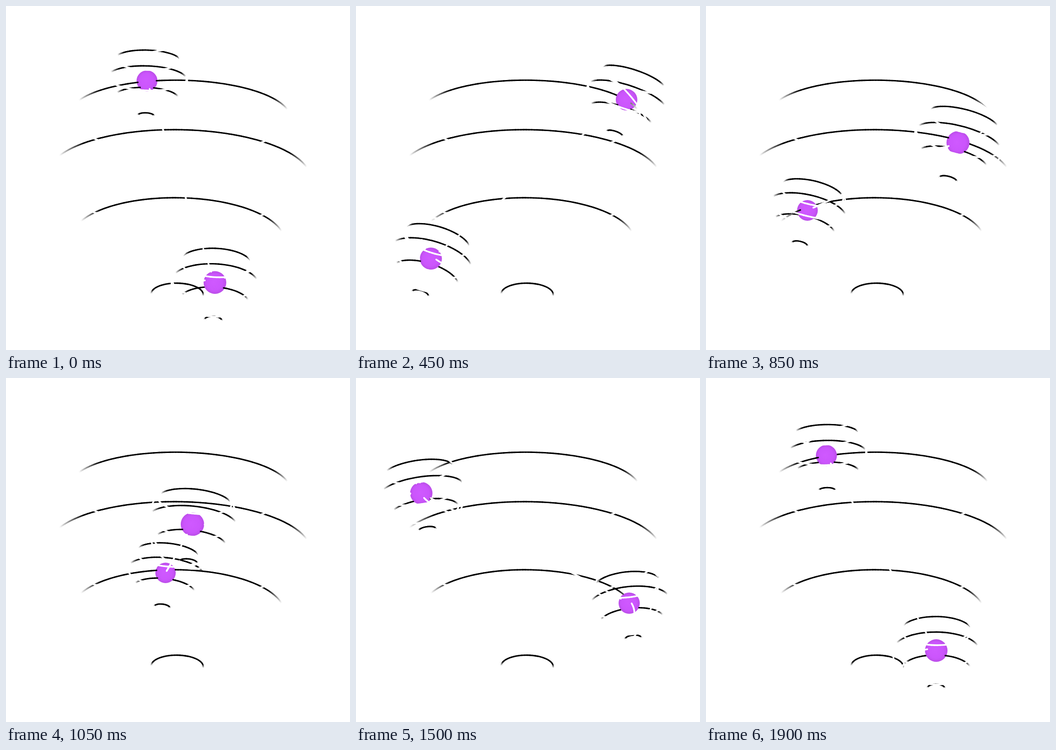
An HTML page with a canvas that plays this animation: 748 px wide and 748 px high, repeating every 1950 ms.

```html
<!DOCTYPE html>
<html lang="en">
<head>
<meta charset="utf-8">
<title>Orbits</title>
<style>
  html, body { margin: 0; width: 100%; height: 100%; overflow: hidden; background: #fff; }
  canvas { display: block; width: 748px; height: 748px; }
</style>
</head>
<body>
<canvas id="stage" width="748" height="748"></canvas>
<script>
const ctx = document.getElementById('stage').getContext('2d');
const RAD = Math.PI / 180;
const LOOP = 1950, STEP = 50, TURN = 1967;
const FOCAL = 3900, CENTER = { x: 376, y: 374 };
const SIN_P = Math.sin(21.2 * RAD), COS_P = Math.cos(21.2 * RAD);
const BASE_ROLL = 0.8, SMALL = 0.313, BALL_R = 23.7;
const DARK_LINE = 3.1, WHITE_LINE = 3.6;

// Rings of one globe; each is dark between the azimuths from and to (0 = far side).
const RINGS = [
  { y: 146, r: 237, from: -69, to: 80 },
  { y: 9.5, r: 285.5, from: -69, to: 80 },
  { y: -140, r: 234, from: -69, to: 80 },
  { y: -277.5, r: 58, from: -92, to: 102 }
];
const FADE = 20;
const OUTLINE = { r: 290, y: -10 };

// Balls on their orbits; lift raises the small globe above its ball.
const BODIES = [
  { y: 147.5, r: 236.5, phase: -18.3, lift: 4 },
  { y: -147.5, r: 234, phase: 160.7, lift: 0 }
];

// World to view: x right, y up, z towards the eye.
function view(p) {
  return { x: p.x, y: p.y * COS_P - p.z * SIN_P, z: p.y * SIN_P + p.z * COS_P };
}

function project(v) {
  const s = FOCAL / (FOCAL - v.z);
  return { x: CENTER.x + v.x * s, y: CENTER.y - v.y * s, z: v.z, s };
}

function onRing(origin, y, r, azimuth, roll) {
  const x = r * Math.sin(azimuth), c = Math.cos(roll), s = Math.sin(roll);
  return {
    x: origin.x + x * c + y * s,
    y: origin.y + y * c - x * s,
    z: origin.z - r * Math.cos(azimuth)
  };
}

function darkness(ring, deg) {
  const edge = Math.min(deg - ring.from, ring.to - deg);
  return Math.max(0, Math.min(1, edge / FADE));
}

// Splits a curve into short pieces that can be sorted by depth.
function addCurve(pieces, count, pointAt, darkAt) {
  let last = project(pointAt(0));
  for (let i = 1; i <= count; i++) {
    const next = project(pointAt(i / count));
    pieces.push({ a: last, b: next, z: (last.z + next.z) / 2, dark: darkAt((i - 0.5) / count) });
    last = next;
  }
}

function addGlobe(pieces, origin, scale, roll) {
  const steps = r => Math.max(30, Math.round(r * scale));
  for (const ring of RINGS) {
    const degAt = u => u * 360 - 180;
    addCurve(pieces, steps(ring.r),
      u => view(onRing(origin, ring.y * scale, ring.r * scale, degAt(u) * RAD, roll)),
      u => darkness(ring, degAt(u)));
  }
  const mid = view(origin), r = OUTLINE.r * scale;
  addCurve(pieces, steps(OUTLINE.r), u => ({
    x: mid.x + r * Math.cos(u * 2 * Math.PI),
    y: mid.y + OUTLINE.y * scale + r * Math.sin(u * 2 * Math.PI),
    z: mid.z
  }), () => 0);
}

function addSpoke(pieces, end) {
  addCurve(pieces, 70, u => view({ x: end.x * u, y: end.y * u, z: end.z * u }), () => 0);
}

function hiddenBy(ball, piece) {
  const dx = (piece.a.x + piece.b.x) / 2 - ball.x;
  const dy = (piece.a.y + piece.b.y) / 2 - ball.y;
  const depth = ball.r * ball.r - dx * dx - dy * dy;
  return depth > 0 && piece.z < ball.z + Math.sqrt(depth);
}

function drawBall(ball) {
  const g = ctx.createRadialGradient(ball.x - 3, ball.y - 1, 0, ball.x, ball.y, ball.r);
  g.addColorStop(0, '#cf59ff');
  g.addColorStop(0.7, '#cb55fc');
  g.addColorStop(1, '#bb4ee8');
  ctx.fillStyle = g;
  ctx.beginPath();
  ctx.arc(ball.x, ball.y, ball.r, 0, 2 * Math.PI);
  ctx.fill();
}

function drawPiece(p) {
  const level = Math.round(255 * (1 - p.dark));
  ctx.strokeStyle = `rgb(${level},${level},${level})`;
  ctx.lineWidth = p.dark ? DARK_LINE : WHITE_LINE;
  ctx.beginPath();
  ctx.moveTo(p.a.x, p.a.y);
  ctx.lineTo(p.b.x, p.b.y);
  ctx.stroke();
}

function render(time) {
  const turn = 2 * Math.PI * time / TURN;
  const smallRoll = (5.1 - 3 * Math.cos(turn) + 11.9 * Math.sin(turn)) * RAD;
  const baseRoll = BASE_ROLL * RAD;
  const origin = { x: 0, y: 0, z: 0 };
  const pieces = [], balls = [];

  addGlobe(pieces, origin, 1, baseRoll);
  for (const body of BODIES) {
    const p = onRing(origin, body.y, body.r, turn + body.phase * RAD, baseRoll);
    const q = project(view(p));
    balls.push({ x: q.x, y: q.y, z: q.z, r: BALL_R * q.s });
    addGlobe(pieces, { x: p.x, y: p.y + body.lift, z: p.z }, SMALL, smallRoll);
    addSpoke(pieces, p);
  }

  ctx.fillStyle = '#fff';
  ctx.fillRect(0, 0, 748, 748);
  ctx.lineCap = 'round';
  pieces.sort((a, b) => a.z - b.z);
  const behind = p => balls.some(ball => hiddenBy(ball, p));
  pieces.filter(behind).forEach(drawPiece);
  balls.forEach(drawBall);
  pieces.filter(p => !behind(p)).forEach(drawPiece);
}

const start = performance.now();
let shownTime = -1;
function tick(now) {
  const time = Math.floor((Math.max(0, now - start) % LOOP) / STEP) * STEP;
  if (time !== shownTime) render(shownTime = time);
  requestAnimationFrame(tick);
}
render(0);
requestAnimationFrame(tick);
</script>
</body>
</html>
```
